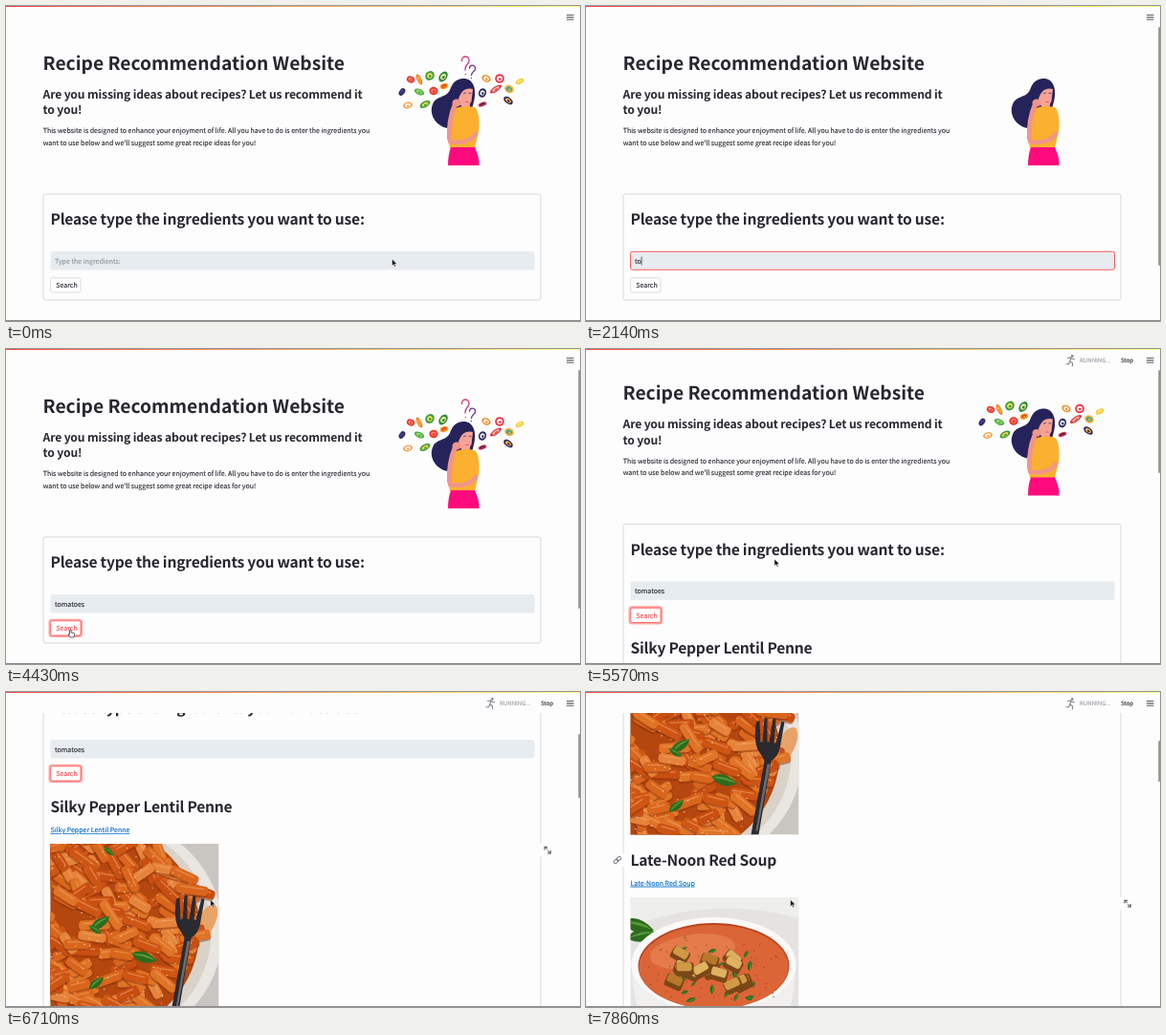
Recreate the animation shown at these times as an HTML page. Size 600 by 330 pixels, loop 8 s.

```html
<!DOCTYPE html>
<html lang="en">
<head>
<meta charset="utf-8">
<title>Recipe Recommendation Website</title>
<style>
  html, body { margin: 0; width: 100%; height: 100%; overflow: hidden; background: #fdfdfd; }
  svg { display: block; width: 100vw; height: 100vh; }
  text {
    font: 7.03px "Noto Sans CJK JP", "Noto Sans CJK SC", "Noto Sans CJK", "Open Sans", sans-serif;
    color: #262730; fill: currentColor; stroke: currentColor; stroke-width: .12px;
    text-rendering: geometricPrecision; white-space: pre;
  }
  .h1, .h2, .h3 { stroke: none; }
  .h1 { font-size: 19.23px; font-weight: 700; }
  .h2 { font-size: 15.6px; font-weight: 600; letter-spacing: -.0145em; }
  .h3 { font-size: 12.15px; font-weight: 600; letter-spacing: -.0125em; }
  .small { font-size: 6.1px; }
  .link { color: #0068c9; text-decoration: underline; }
  .line { fill: none; stroke-linecap: round; stroke-linejoin: round; }
</style>
</head>
<body>
<svg viewBox="0 0 600 330" preserveAspectRatio="none">
  <defs>
    <linearGradient id="stripe"><stop stop-color="#ff4b4b"/><stop offset="1" stop-color="#fffd80"/></linearGradient>
    <clipPath id="square"><rect width="176" height="176"/></clipPath>
  </defs>
  <rect width="600" height="330" fill="#fdfdfd"/>

  <g id="page">
    <text class="h1" x="38.5" y="66.5">Recipe Recommendation Website</text>
    <text class="h3" x="38.5" y="96.7">Are you missing ideas about recipes? Let us recommend it</text>
    <text class="h3" x="38.5" y="113">to you!</text>
    <text x="38.7" y="133.2">This website is designed to enhance your enjoyment of life. All you have to do is enter the ingredients you</text>
    <text x="38.7" y="145.6">want to use below and we'll suggest some great recipe ideas for you!</text>

    <g id="foods"></g>
    <g id="questions" class="line" stroke="#d0387f" stroke-width="1.3">
      <path d="M476.5 57.5c-.5-6 8-6 7.500 0c-.4 4-4.500 4-4 9.500M480.300 71.500v.3"/>
      <path stroke="#6a3a86" d="M484.500 65c1-4.500 7-3 6 1c-.8 3-3.800 3-4 6.500M486.300 75.500v.2"/>
    </g>
    <g id="woman">
      <path fill="#26235a" d="M477 76C488 75 492 86 489.500 98L487 108L470 114L461 128C448 125 442 112 446 103C450 93 460 97 464 88C467 80 470 77 477 76Z"/>
      <path fill="#f0968a" d="M476 100h9v10h-9z"/>
      <path fill="#fbb02f" d="M467 109C472 104 488 104 491 107C495 112 495 125 494 132L490 149H464L461 132Z"/>
      <path fill="#f6a397" d="M472 90C476 84 484 82 488 87L486.500 100C484 106 478 107 474 103Z"/>
      <path fill="#26235a" d="M470 93C469 82 482 78 488.500 87C480 85 476 89 473 97Z"/>
      <path class="line" stroke="#26235a" stroke-width=".7" d="M478.500 91.500l2-.4M484 91.300l2 .2"/>
      <path class="line" stroke="#d9486f" stroke-width=".8" d="M480.500 100.500l3 0"/>
      <path class="line" stroke="#f0968a" stroke-width="5" d="M469 104C464 116 463 128 463.500 139"/>
      <path class="line" stroke="#f0968a" stroke-width="4.500" d="M464 142C474 144 486 142 491 134"/>
      <ellipse cx="471" cy="101.500" rx="4.500" ry="4" fill="#f0968a"/>
      <path fill="#ff0a7c" d="M465 148H490C493 154 495 161 494.500 167H462C462 160 463 153 465 148Z"/>
    </g>

    <rect id="card" x="39" y="197" width="520" height="111" rx="2" fill="none" stroke="#d8d9dd"/>
    <text class="h2" x="46.500" y="229">Please type the ingredients you want to use:</text>
    <rect x="46.500" y="257" width="506" height="19.500" rx="2" fill="#e7ecf0"/>
    <rect id="focus" x="46.500" y="257.300" width="506" height="19" rx="2" fill="none" stroke="#ff5c5c"/>
    <text id="entry" x="51" y="269.700"></text>
    <path id="caret" stroke="#262730" stroke-width=".7"/>
    <rect id="ring" x="45.500" y="283.700" width="33.500" height="17.400" rx="2.500" fill="none" stroke="#ff4b4b" stroke-opacity=".5" stroke-width="2"/>
    <rect id="button" x="46.700" y="284.800" width="31.300" height="15.200" rx="2" fill="#fff" stroke-width=".8"/>
    <text id="search" x="52.300" y="295.200">Search</text>

    <g id="results">
      <text class="h2" x="46.500" y="332.500">Silky Pepper Lentil Penne</text>
      <text class="link" x="46.500" y="354.200">Silky Pepper Lentil Penne</text>
      <g id="pasta" transform="translate(46.500 366)" clip-path="url(#square)"></g>
      <text class="h2" x="46.500" y="574.500">Late-Noon Red Soup</text>
      <text class="link" x="46.500" y="595.200">Late-Noon Red Soup</text>
      <g id="soup" transform="translate(46.500 607.500)" clip-path="url(#square)"></g>
      <g id="anchor">
        <path fill="#fdfdfd" d="M27-7h14v14h-14z"/>
        <g class="line" stroke="#777a84" stroke-width="1" transform="translate(32.800) rotate(-42)">
          <rect x="-4.500" y="-1.700" width="5" height="3.400" rx="1.700"/>
          <rect x="-.5" y="-1.700" width="5" height="3.400" rx="1.700"/>
        </g>
      </g>
      <g id="expand">
        <path fill="#fdfdfd" d="M557.500-7h17v14h-17z"/>
        <path class="line" stroke="#444650" stroke-width="1" d="M563-.5V-3.200H565.700M563-3.200l2.600 2.400M569.200 .8V3.500H566.500M569.200 3.500l-2.600-2.400"/>
      </g>
    </g>
  </g>

  <rect width="600" height="22" fill="#fdfdfd"/>
  <rect width="600" height="1" fill="url(#stripe)"/>
  <path stroke="#5b5d67" stroke-width="1.100" d="M586 9.500h7.500M586 11.900h7.500M586 14.200h7.500"/>
  <g id="status">
    <g class="line" stroke="#80848f" stroke-width="1.100">
      <g id="runner">
        <circle cx="508.300" cy="7.300" r=".8" fill="#80848f"/>
        <path d="M503.500 9.500l3-.7l1.500 1.200l2.500 .8M507 9.500l-1.200 3.500l2.700 1.700v3M505.800 13l-1.300 2.700h-2.500"/>
      </g>
      <g id="bike">
        <circle cx="503" cy="14.500" r="2.500"/><circle cx="509.500" cy="14.500" r="2.500"/>
        <circle cx="508" cy="7" r=".7" fill="#80848f"/>
        <path d="M506.300 15v-2.500l-2-1.500l2.700-2l1.500 1.800h2"/>
      </g>
    </g>
    <text class="small" x="516" y="14.400" style="color:#9b9da6">RUNNING...</text>
    <text class="small" x="559" y="14.400">Stop</text>
  </g>
  <rect id="thumb" x="598.300" width="1.700" rx=".8" fill="#929295"/>
  <rect y="329" width="600" height="1" fill="#8c8c90"/>

  <g id="pointer">
    <path id="arrow" fill="#111" stroke="#fff" stroke-width=".5" d="M0 0V7.200L1.700 5.700L2.800 8.200L4 7.700L2.900 5.300H5.200Z"/>
    <path id="beam" class="line" stroke="#222" stroke-width=".9" d="M-1.500-3.500Q0-3.500 0-2.500V3Q0 4 -1.500 4M1.500-3.500Q0-3.500 0-2.500M0 3Q0 4 1.500 4"/>
    <path id="hand" fill="#fff" stroke="#222" stroke-width=".7" d="M0 .8Q.8-.4 1.500 .8V3.500L4.800 4.200Q5.500 5 4.500 8.500H.8L-1.500 5.500Q-1.300 4.600 0 5.300Z"/>
  </g>
</svg>

<script>
const el = Object.fromEntries([...document.querySelectorAll('[id]')].map(e => [e.id, e]));
const LOOP = 8000, STEPS = 56;

let seed = 7;
const random = (lo = 0, hi = 1) => {
  seed = (seed * 16807) % 2147483647;
  return lo + (hi - lo) * seed / 2147483647;
};
const pick = list => list[Math.floor(random(0, list.length))];
const repeat = (count, make) => Array.from({ length: count }, make).join('');
const ellipse = (x, y, rx, ry, fill, turn = 0) =>
  `<ellipse rx="${rx}" ry="${ry}" fill="${fill}" transform="translate(${x} ${y}) rotate(${turn})"/>`;
const path = (d, fill) => `<path d="${d}" fill="${fill}"/>`;
const leaf = (x, y, size, turn) =>
  `<g transform="translate(${x} ${y}) rotate(${turn}) scale(${size})">` +
  path('M-10 0Q-3-8 10 0Q0 8 -10 0Z', '#2d6b1d') + path('M-9 0Q0-4 9 0Q0-1 -9 0Z', '#5a9a3c') + '</g>';

// x, y, rx, ry, turn, outer colour, inner colour
const foods = [
  [414, 90, 2.8, 4.2, 35, '#2b2863', '#4a4590'], [423, 77, 4.2, 3.4, 20, '#e8352e', '#ff8f7a'],
  [432, 77, 2.4, 6, -25, '#f5821f', '#f9b24a'], [443, 73, 4.5, 5.2, 40, '#3f9b3a', '#e8d95a'],
  [457, 74, 4, 6, 35, '#2f8a3d', '#f4e59a'], [420, 104, 5, 3.4, -12, '#f6a04d', '#fff'],
  [432, 90, 5.5, 3, 25, '#49ae45', '#a7d86c'], [438, 103, 6, 3.2, -30, '#3f9b3a', '#f4d94f'],
  [447, 89, 4.6, 4.2, 0, '#e8352e', '#ff8066'], [458, 84, 4.4, 3, -20, '#f8a51c', '#e8352e'],
  [502, 76, 4.8, 3.6, 25, '#ef8c22', '#fdfdfd'], [516, 76, 4.8, 4.8, 0, '#e93a4b', '#fdfdfd'],
  [512, 87, 7, 2.6, -35, '#d93545', '#ffc1a6'], [498, 91, 4, 4.8, 20, '#2b2863', '#f5f3ee'],
  [526, 87, 5, 4, 25, '#f6b33d', '#2ba79b'], [525, 99, 5.5, 3.3, 38, '#2b2863', '#f6b33d'],
  [537, 79, 4.5, 2.6, -25, '#f9c62e', '#fff0a0'], [498, 103, 4.6, 2.2, -20, '#e93a4b', '#2b2863'],
];
el.foods.innerHTML = foods.map(([x, y, rx, ry, turn, outer, inner]) =>
  '<g>' + ellipse(0, 0, rx, ry, outer, turn) + ellipse(0, 0, rx * .62, ry * .58, inner, turn) +
  ellipse(.3, .5, rx * .3, ry * .28, outer, turn) + '</g>').join('');

const disc = (cx, cy, radius) => {
  const a = random(0, Math.PI * 2), r = radius * Math.sqrt(random());
  return [cx + r * Math.cos(a), cy + r * Math.sin(a)];
};
const penne = (x, y, turn) => {
  const w = random(24, 36);
  return `<g transform="translate(${x} ${y}) rotate(${turn})">` +
    `<rect x="${-w / 2}" y="-4" width="${w}" height="11" rx="4" fill="#8c300a" opacity=".5"/>` +
    `<rect x="${-w / 2}" y="-5" width="${w}" height="10" rx="4" fill="${pick(['#cf5514', '#d9661c', '#e07426', '#c94e12', '#e6833a'])}"/>` +
    `<path d="M${-w / 2 + 4}-2H${w / 2 - 5}" stroke="#f2a468" stroke-width="1.300" opacity=".6"/></g>`;
};
el.pasta.innerHTML =
  path('M0 0H176V176H0Z', '#c9c5c0') + ellipse(62, 92, 118, 118, '#e9e5e0') + ellipse(60, 92, 108, 110, '#d9d2c8') +
  ellipse(163, 82, 9, 20, '#e8a368', 25) + ellipse(52, 90, 104, 108, '#b3470f') +
  repeat(190, () => penne(...disc(52, 90, 100), random(-35, 75))) +
  penne(140, 33, 25) + penne(158, 50, 20) + penne(148, 48, 8) +
  repeat(170, () => ellipse(...disc(55, 90, 100), random(.4, .9), .6, '#f6d6ae')) +
  leaf(52, 83, 1.2, -35) + leaf(47, 90, .8, 30) + leaf(98, 119, 1.4, 15) + leaf(48, 146, 1, -40) + leaf(61, 8, .7, 40) +
  path('M132 57Q128 75 133 87Q138 94 140 99L126 176H134L147 99Q154 94 156 86L161 58L158 57L152 80L150 80L152 55L149 54L145 79L143 79L143 54L140 54L138 79L136 79L135 57Z', '#2a2a30') +
  path('M143 102L131 172L133 172L146 102Z', '#6b6b72');

el.soup.innerHTML =
  path('M0 0H176V176H0Z', '#e4e3e2') + path('M0 0H176V22Q90-2 0 30Z', '#eeeeed') +
  leaf(8, 30, 1.7, 15) + leaf(12, 40, 1.6, -12) +
  path('M1 70Q4 150 50 176H126Q170 150 173 70Z', '#f1f0ef') + ellipse(87, 70, 86, 49, '#faf9f8') +
  ellipse(87, 72, 79, 45, '#b9441f') + ellipse(87, 73, 78, 44, '#dc6537') +
  ellipse(65, 57, 45, 18, '#e57a4b', -8) +
  repeat(65, () => ellipse(87 + random(-68, 68), 72 + random(-32, 35), .7, .5, '#7b4018')) +
  repeat(24, () => leaf(84 + random(-42, 54), 80 + random(-28, 30), random(.3, .6), random(0, 180))) +
  repeat(15, () => {
    const x = 80 + random(-36, 38), y = 78 + random(-20, 18), turn = random(-30, 40);
    return `<g transform="translate(${x} ${y}) rotate(${turn})"><rect x="-9" y="-6" width="19" height="14" rx="3" fill="#7c4716"/>` +
      `<rect x="-8" y="-6" width="16" height="9" rx="2.500" fill="${pick(['#d09a45', '#b9792b', '#dfb160'])}"/></g>`;
  });

const clamp = v => Math.min(1, Math.max(0, v));
// Piecewise linear values: each key is [step, ...values].
const track = (step, keys) => {
  const i = keys.findIndex(k => k[0] > step);
  if (i === 0) return keys[0].slice(1);
  if (i < 0) return keys.at(-1).slice(1);
  const a = keys[i - 1], b = keys[i], p = (step - a[0]) / (b[0] - a[0]);
  return a.slice(1).map((v, j) => v + (b[j + 1] - v) * p);
};
const overshoot = p => 1 + 2.7 * (p - 1) ** 3 + 1.7 * (p - 1) ** 2;
const show = (node, on) => node.setAttribute('display', on ? 'inline' : 'none');
const set = (node, attrs) => { for (const k in attrs) node.setAttribute(k, attrs[k]); };

const WORD = 'tomatoes';
const keyTimes = [13, 14, 17, 18, 20, 21, 22, 23];
const scrollKeys = [[38, 0], [39, 13.5], [43, 94.5], [47, 207], [55, 392.5]];
const thumbKeys = [[39, 22, 108], [43, 24, 79], [47, 44, 67], [55, 51, 43]];
const pointerKeys = [[24, 403.5, 265], [25, 330, 284], [27, 130, 306], [28, 75, 297], [29, 66.5, 293.5],
  [34, 66.5, 293.5], [38, 186, 226], [39, 197, 220], [41, 213.7, 217.5]];

// The illustration repeats on its own, shorter cycle.
function drawIllustration(step) {
  const phase = step % 29, leaving = phase < 16;
  [...el.foods.children].forEach((item, i) => {
    const leave = clamp((phase - 10 - i * .08) / 2.5), enter = clamp((phase - 18 - i * .25) / 2);
    const size = leaving ? 1 - leave * leave : overshoot(enter);
    set(item, { transform: `translate(${foods[i][0]} ${foods[i][1]}) scale(${Math.max(0, size)})` });
  });
  const leave = clamp((phase - 7) / 3), enter = clamp((phase - 25) / 3);
  set(el.questions, leaving
    ? { opacity: 1 - leave, transform: `translate(0 ${-15 * leave})` }
    : { opacity: enter, transform: `translate(0 ${5 * (1 - enter)})` });
}

function drawForm(step) {
  const typed = WORD.slice(0, keyTimes.filter(k => k <= step).length);
  const clicked = step >= 29, focused = step >= 7 && !clicked;
  el.entry.textContent = typed || 'Type the ingredients:';
  el.entry.style.color = typed ? '#262730' : '#8f949d';
  set(el.focus, { opacity: focused ? clamp((step - 6) / 3) : 0 });
  const caretX = 51.3 + (typed ? el.entry.getComputedTextLength() : 0);
  set(el.caret, { d: `M${caretX} 262.500V271.500` });
  show(el.caret, focused && Math.floor(step / 3.5) % 2 === 0);
  show(el.ring, clicked);
  set(el.button, { stroke: clicked ? '#ff4b4b' : '#d3d4d8' });
  el.search.style.color = clicked ? '#f0484c' : '#262730';
}

function drawPage(step) {
  const [scroll] = track(step, scrollKeys), loaded = step >= 33;
  set(el.page, { transform: `translate(0 ${-scroll})` });
  set(el.card, { height: loaded ? 900 : 111 });
  show(el.results, loaded);

  const headingHover = scroll > 100 && scroll < 135 ? 326.5 : scroll > 345 ? 568.5 : 0;
  const imageHover = scroll > 145 && scroll < 321 ? 372.5 : scroll > 387 ? 614 : 0;
  show(el.anchor, headingHover);
  set(el.anchor, { transform: `translate(0 ${headingHover})` });
  show(el.expand, imageHover);
  set(el.expand, { transform: `translate(0 ${imageHover})` });

  show(el.status, step >= 32);
  const cycling = [2, 3, 4].includes(step % 8);
  show(el.bike, cycling);
  show(el.runner, !cycling);

  const [y, height] = loaded ? track(step, thumbKeys) : [22, 250];
  set(el.thumb, { y, height });
  show(el.thumb, step >= 4);
  return scroll;
}

function drawPointer(step, scroll) {
  const [x, y] = track(step, pointerKeys);
  set(el.pointer, { transform: `translate(${x} ${y})` });
  show(el.pointer, step < 13 || step >= 24);
  const overText = (step > 0 && step < 13) || (scroll > 80 && scroll < 112);
  const kind = overText ? 'beam' : step >= 29 && step < 35 ? 'hand' : 'arrow';
  for (const name of ['arrow', 'beam', 'hand']) show(el[name], name === kind);
}

const start = performance.now();
// Steps fall on times rounded to 10 ms, so each may begin a little early.
const EARLY = 8;
function draw(now) {
  const time = Math.max(0, now - start) + EARLY;
  const step = Math.floor((time % LOOP) / LOOP * STEPS);
  drawIllustration(step);
  drawForm(step);
  drawPointer(step, drawPage(step));
  requestAnimationFrame(draw);
}
draw(start);
</script>
</body>
</html>
```
